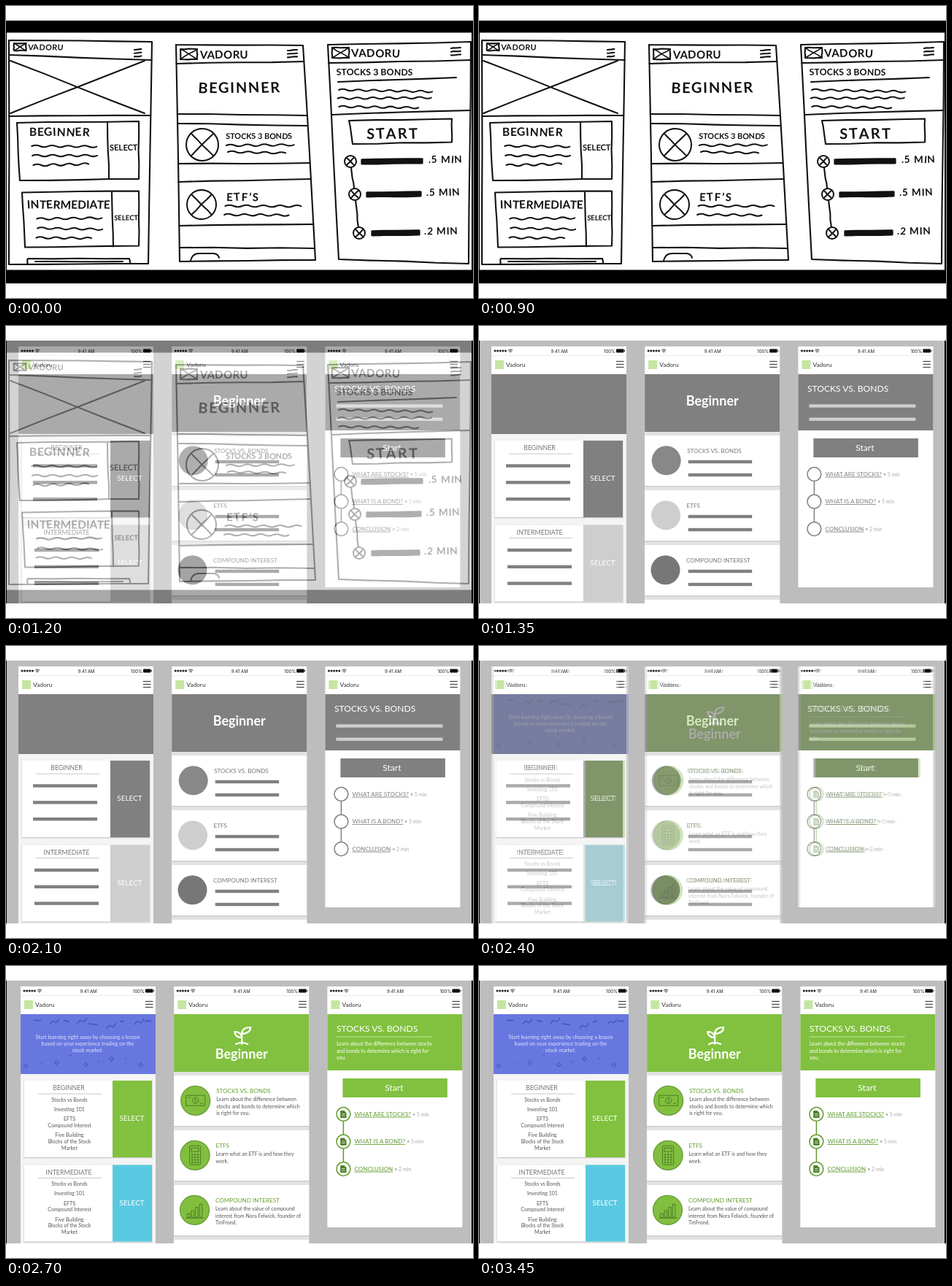
Animation, 640 px wide and 400 px high, one loop 3.6 s. Source, as an HTML page:

```html
<!DOCTYPE html>
<html>
<head>
<meta charset="utf-8">
<style>
  html, body { margin: 0; overflow: hidden; background: #fff; }
  svg { display: block; width: 640px; height: 400px; font-family: Lato, sans-serif; }
  .status { font-family: Inter, sans-serif; }
  #sketch text { font-weight: 700; }
</style>
</head>
<body>
<svg viewBox="0 0 640 400">
  <clipPath id="stage"><rect x="1" y="20" width="637" height="360"/></clipPath>
  <rect y="20" width="640" height="360"/>
  <g clip-path="url(#stage)">
    <g id="final"></g><g id="wire"></g><g id="sketch"></g>
  </g>
</svg>
<script>
const $ = id => document.getElementById(id);
const times = (n, fn) => Array.from({ length: n }, (_, i) => fn(i)).join('');
const rect = (x, y, w, h, fill, more = '') =>
  `<rect x="${x}" y="${y}" width="${w}" height="${h}" fill="${fill}" ${more}/>`;
const circle = (x, y, r, fill, stroke = 'none', width = 1.3) =>
  `<circle cx="${x}" cy="${y}" r="${r}" fill="${fill}" stroke="${stroke}" stroke-width="${width}"/>`;
const path = (d, stroke, width = 1, fill = 'none') =>
  `<path d="${d}" stroke="${stroke}" stroke-width="${width}" fill="${fill}" stroke-linecap="round" stroke-linejoin="round"/>`;
const text = (x, y, size, fill, str, more = '') =>
  `<text x="${x}" y="${y}" font-size="${size}" fill="${fill}" ${more}>${str}</text>`;
const middle = 'text-anchor="middle"';
const lines = (x, y, gap, size, fill, strs, more) =>
  times(strs.length, i => text(x, y + i * gap, size, fill, strs[i], more));

let seed = 7;
const jitter = n => ((seed = seed * 16807 % 2147483647) / 2147483647 - .5) * n;

// ---------- hand-drawn screens ----------
const INK = '#111';

function ink(points, width = 2.1) {
  let d = `M${points[0]},${points[1]}`;
  for (let i = 2; i < points.length; i += 2) {
    const [x0, y0, x1, y1] = points.slice(i - 2, i + 2);
    for (let k = 1; k <= 4; k++) {
      const j = k < 4 ? 1 : 0;
      d += `L${x0 + (x1 - x0) * k / 4 + jitter(j)},${y0 + (y1 - y0) * k / 4 + jitter(j)}`;
    }
  }
  return path(d, INK, width);
}
const box = (x, y, w, h, lean = 0) =>
  ink([x, y, x + w, y - lean / 2, x + w, y + h - lean / 2, x + lean, y + h, x, y]);
const cross = (x, y, w, h, width = 1.6) =>
  ink([x, y, x + w, y + h], width) + ink([x, y + h, x + w, y], width);
const crossCircle = (x, y, r) =>
  circle(x, y, r, 'none', INK, 2) + cross(x - r * .7, y - r * .7, r * 1.4, r * 1.4, 2);
const letters = (x, y, size, str, gap = 0) => text(x, y, size, INK, str,
  `letter-spacing="${gap}" rotate="${[...str].map(() => jitter(9).toFixed(1)).join(' ')}"`);

function scribbles(x, y, w, n, gap) {
  return times(n, i => {
    const length = i && i === n - 1 ? w * .85 : w, half = length / Math.round(length / 11);
    return path(`M${x + jitter(3)},${y + i * gap}q${half / 2},-2.4 ${half},0` +
      `t${half},${jitter(.6)}`.repeat(Math.round(length / half) - 1), INK, 2);
  });
}

// Outline with leaning sides, plus rows [leftY, rightY] ruled from side to side.
function inkPhone([x0, y0], [x1, y1], [x2, y2], [x3, y3], rows) {
  const leftX = y => x0 + (x3 - x0) * (y - y0) / (y3 - y0);
  const rightX = y => x1 + (x2 - x1) * (y - y1) / (y2 - y1);
  return ink([x0, y0, x1, y1, x2, y2, x3, y3, x0, y0]) +
    rows.map(([a, b]) => ink([leftX(a), a, rightX(b), b])).join('');
}
function inkHeader(x, y, k, menuX, menuY) {
  return box(x, y, 23 * k, 14 * k) + cross(x, y, 23 * k, 14 * k) +
    letters(x + 26.5 * k, y + 13 * k, 15 * k, 'VADORU', .4) +
    times(3, i => ink([menuX, menuY + i * 4.7, menuX + 13 * k, menuY + i * 4.7 - 1]));
}

function sketch() {
  let s = rect(0, 20, 640, 360, '#000') + rect(1, 36.5, 637, 325, '#fff');

  s += inkPhone([4, 47], [200, 49], [195, 353], [4, 354], [[67, 74], [151, 150]]);
  s += inkHeader(11, 51, .72, 176, 60) + cross(6, 75, 184, 72, 2);
  s += ['BEGINNER', 'INTERMEDIATE'].map((name, i) => {
    const x = 15 + i * 7, y = 160 + i * 95.5;
    return box(x, y, 167 - i * 7, 79 - i * 4, 4) + ink([139 + i * 6, y, 141 + i * 6, y + 77 - i * 3]) +
      letters(32 - i * 3, y + 18 + i * 4, 15.5, name, .7 - i * .6) +
      letters(142 + i * 6, y + 38, 11.2 - i * 1.6, 'SELECT') +
      scribbles(36 + i * 6, y + 32 + i * 4, 89, 3, 13);
  }).join('');
  s += ink([29, 354, 30, 346, 169, 346, 170, 353]) + ink([40, 350, 160, 350]);

  s += inkPhone([233, 53], [407, 54], [424, 348], [238, 350],
    [[79, 76], [148, 150], [161, 164], [216, 215], [241, 237], [301, 299], [331, 332]]);
  s += inkHeader(239, 59, 1, 386, 61) + letters(263, 119, 20, 'BEGINNER', 1.8);
  s += crossCircle(269, 190, 22) + letters(301, 182, 10.8, 'STOCKS 3 BONDS') + scribbles(303, 191, 93, 2, 9);
  s += crossCircle(268, 272, 20) + letters(302, 267, 15, 'ETF’S', 1.5) + scribbles(300, 274, 104, 2, 12);
  s += path('M253,349q2,-10 12,-10h20q6,1 7,6', INK, 2);

  s += inkPhone([441, 53], [637, 49], [634, 353], [456, 347], [[78, 74], [149, 143]]);
  s += inkHeader(447, 57, 1, 610, 58) + letters(453, 95, 12.2, 'STOCKS 3 BONDS', .1);
  s += ink([455, 104, 617, 98]) + scribbles(455, 115, 128, 3, 11.5);
  s += box(470, 157, 141, 32, 5) + letters(494, 182, 20, 'START', 2.6);
  s += [213, 258, 311].map((y, i) => {
    const x = 472 + i * 6, barX = 488 + i * 7, barEnd = 570 - i * 2;
    return crossCircle(x, y, 8) + (i < 2 ? ink([x + 1, y + 8, x + 5, y + 37 + i * 8]) : '') +
      times(3, k => ink([barX, y - 2 + k * 2.4, barEnd, y - 3 + k * 2.4], 3.6)) +
      letters(579 - i * 3, y + 2, 13.5, i < 2 ? '.5 MIN' : '.2 MIN', .9);
  }).join('');
  return s;
}

// ---------- designed screens ----------
const gray = { dark: '#808080', hero: '#808080', second: '#cecece', title: '#777', link: '#808080',
  discs: ['#888', '#cecece', '#777'], rim: 'none' };
const color = { dark: '#82c13f', hero: '#6877e0', second: '#59c9e1', title: '#64a02d', link: '#5f9a2c',
  discs: Array(3).fill('#82bf3f'), rim: '#659a34' };
const DEEP = '#4c7f25';

const bars = (x, y, w, n, gap, fill = '#808080') => times(n, i => rect(x, y + i * gap - 2.2, w, 4.4, fill));
const card = (x, y, w, h) => rect(x - .5, y, w + 1, h + 1.3, '#c9c9c9') + rect(x, y, w, h, '#fff');

function frame(x, bottom) {
  return rect(x, 28, 185, bottom - 28, '#fff') +
    times(5, i => circle(x + 5 + i * 3.6, 34, 1.5, '#222')) +
    path(`M${x + 23.2},33q2.8,-2.4 5.6,0M${x + 24.4},34.6q1.6,-1.4 3.2,0`, '#222', .9) +
    circle(x + 26, 36, .7, '#222') +
    text(x + 93, 36.5, 6, '#222', '9:41 AM', middle + ' class="status"') +
    text(x + 154, 36.5, 6, '#222', '100%', 'class="status"') +
    rect(x + 171, 31.5, 10.5, 5, '#111', 'rx="1"') + rect(x + 182, 33, 1, 2, '#111') +
    rect(x, 40, 185, .6, '#ddd') + rect(x + 5, 47, 12, 12, '#c5e6a2') +
    text(x + 20, 56, 8.4, '#333', 'Vadoru') +
    times(3, i => rect(x + 171, 47.9 + i * 4, 10.5, 1.2, '#444'));
}

// Loose shapes scattered above and below the hero text.
function confetti(x0) {
  const c = '#4757b5';
  const shapes = [
    (x, y) => rect(x - 2, y - 2, 4, 4, 'none', `stroke="${c}" transform="rotate(45 ${x} ${y})"`),
    (x, y) => path(`M${x},${y}l${7 + jitter(8)},${jitter(6)}`, c, 1.8),
    (x, y) => circle(x, y, 1, c),
    (x, y) => path(`M${x},${y}q3,-6 6,-3t6,-4`, c, 1.5)
  ];
  return times(18, i =>
    shapes[i % 4](x0 + 10 + i * 9.6 + jitter(6), (i % 2 ? 79 : 130) + jitter(16)));
}

const courses = [['Stocks vs Bonds'], ['Investing 101'], ['EFTS', 'Compound Interest'],
  ['Five Building', 'Blocks of the Stock', 'Market']];

function courseList(x, y) {
  return courses.map(course => {
    const s = lines(x, y, 8.6, 7, '#555', course, middle);
    y += 13.4 + (course.length - 1) * 8.6;
    return s;
  }).join('');
}

function lessons(x, k, rich) {
  let s = frame(x, 380) + rect(x, 66, 185, 314, '#f4f4f4') + rect(x, 66, 185, 82, k.hero);
  if (rich) s += confetti(x) + lines(x + 92, 100, 9, 7.2, '#dfe3fb',
    ['Start learning right away by choosing a lesson', 'based on your experience trading on the', 'stock market.'], middle);
  ['BEGINNER', 'INTERMEDIATE'].forEach((name, i) => {
    const y = 157 + i * 115.5;
    s += card(x + 5, y, 175, 105) + rect(x + 126, y, 54, 105, i ? k.second : k.dark);
    s += text(x + 66, y + 13, 8.8, '#777', name, middle) + rect(x + 24, y + 17.7, 87, .8, '#bbb') +
      text(x + 152.5, y + 55, 10, '#fff', 'SELECT', middle);
    s += rich ? courseList(x + 67, y + 28.5) : bars(x + 20 + i * 2, y + 34.5, 88, 3, 22.8);
  });
  return s + card(x + 5, 379.5, 175, 9);
}

const outline = `stroke="${DEEP}"`;
const icons = [
  (x, y) => rect(x - 13, y - 7, 26, 14, 'none', outline) + circle(x, y, 4.3, 'none', DEEP, 1) +
    text(x, y + 2.5, 7, DEEP, '$', middle) + path(`M${x - 10},${y - 4}h3M${x + 7},${y + 4}h3`, DEEP),
  (x, y) => rect(x - 7.5, y - 13, 15, 26, 'none', 'rx="1.5" ' + outline) +
    rect(x - 5, y - 10, 10, 5, 'none', outline) +
    times(12, i => rect(x - 5 + i % 3 * 4, y - 2 + (i / 3 | 0) * 3.6, 2.2, 2.2, DEEP)),
  (x, y) => times(4, i => rect(x - 10 + i * 5.6, y + 5 - i * 4.3, 3.6, 5 + i * 4.3, 'none', outline)) +
    path(`M${x - 12},${y + 11}h25`, DEEP)
];
const topicList = [
  ['STOCKS VS. BONDS', 'Learn about the difference between', 'stocks and bonds to determine which', 'is right for you.'],
  ['ETFS', 'Learn what an ETF is and how they', 'work.'],
  ['COMPOUND INTEREST', 'Learn about the value of compound', 'interest from Nora Felwick, founder of', 'TinFrond.']
];

function topics(x, k, rich) {
  let s = frame(x, 380) + rect(x, 66, 185, 314, '#e2e2e2') + rect(x, 66, 185, 79, k.dark);
  if (rich) s += path(`M${x + 93},107v-14q0,-9 12,-9q0,8 -12,9M${x + 93},98q-9,0 -10,-8q9,0 10,8M${x + 85},107q8,-4 16,0`, '#fff', 2.2);
  s += text(x + 92.5, rich ? 126.5 : 108.5, 18, '#fff', 'Beginner', middle + ' font-weight="700"');
  topicList.forEach(([name, ...about], i) => {
    const y = 150 + i * 75, cx = x + 29.5 - i * .6, tx = x + 58 - i * .6;
    s += card(x, y, 185, 69) + circle(cx, y + 34.3, 20, k.discs[i], k.rim);
    s += text(tx, y + 24.3, 8.1, k.title, name);
    s += rich ? icons[i](cx, y + 34.3) + lines(tx, y + 35, 9.5, 7, '#555', about)
      : bars(x + 59.5, y + 36, 87.5, 2, 18);
  });
  return s + card(x, 375, 185, 9);
}

function steps(x, k, rich) {
  let s = frame(x, 358) + rect(x, 66, 185, 77, k.dark) + text(x + 12.5, 90, 12.1, '#fff', 'STOCKS VS. BONDS');
  s += rich ? rect(x + 12.5, 96.6, 131, .8, '#d5ecb9') + lines(x + 12.5, 109, 9.5, 7, '#fff',
    ['Learn about the difference between stocks', 'and bonds to determine which is right for', 'you.'])
    : bars(x + 15, 109.5, 146, 2, 18.2, '#cecece');
  s += rect(x + 21, 154, 143.5, 26, k.dark) + text(x + 91.5, 170.5, 12, '#fff', 'Start', middle);
  s += path(`M${x + 22},203V278`, k.link, 1.5);
  ['WHAT ARE STOCKS?', 'WHAT IS A BOND?', 'CONCLUSION'].forEach((name, i) => {
    const y = 203 + i * 37.5, cx = x + 22;
    s += circle(cx, y, 9.4, '#fff', k.link, 1.5);
    if (rich) s += path(`M${cx - 3.5},${y - 4.5}h4.5l2.7,2.7v6.6h-7.2z`, DEEP, .8, DEEP) +
      path(`M${cx - 1.8},${y - .5}h3.6M${cx - 1.8},${y + 2}h3.6`, '#fff', .8);
    s += text(x + 37, y + 2.7, 8.15, k.link, `<tspan text-decoration="underline">${name}</tspan>` +
      `<tspan dx="2" font-size="7" fill="#aaa">• ${i < 2 ? 5 : 2} min</tspan>`);
  });
  return s;
}

const design = (dx, k, rich) => rect(0, 20, 640, 360, '#bdbdbd') +
  [lessons, topics, steps].map((screen, i) => screen(17 + i * 210.2 + dx, k, rich)).join('');

$('final').innerHTML = design(3, color, true);
$('wire').innerHTML = design(0, gray, false);
$('sketch').innerHTML = sketch();

// The picture advances in 150 ms steps; each crossfade takes three of them.
const STEP = 150, LOOP = 3600, FADE = 450;
const remaining = (t, start) => 1 - Math.min(1, Math.max(0, (t - start) / FADE));
function draw() {
  const t = Math.floor(performance.now() % LOOP / STEP) * STEP;
  $('sketch').setAttribute('opacity', remaining(t, 900));
  $('wire').setAttribute('opacity', remaining(t, 2250));
  requestAnimationFrame(draw);
}
draw();
</script>
</body>
</html>
```
